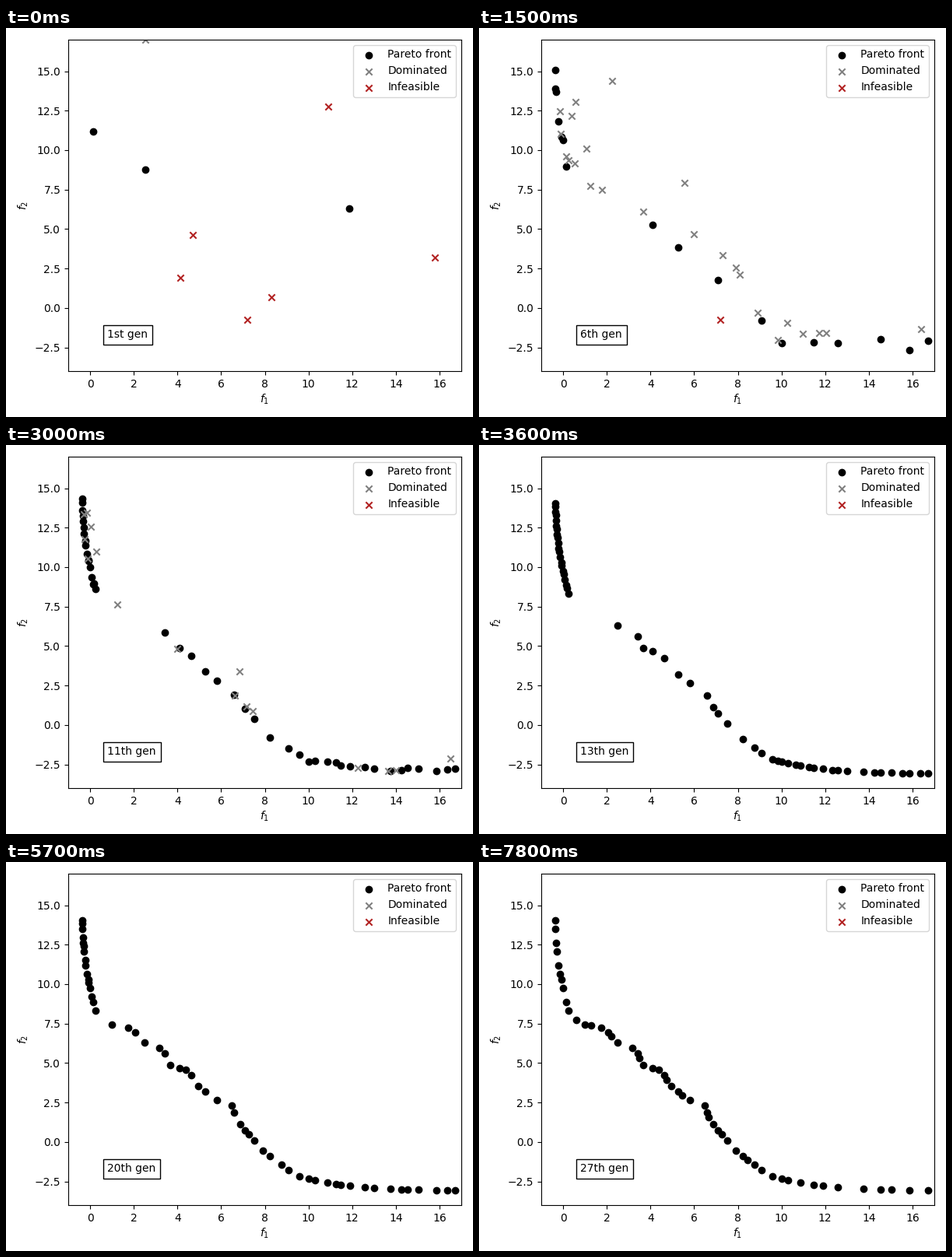
A matplotlib script that plays this animation: 600x500 px, repeating every 8 s.

```python
import numpy as np
import matplotlib.pyplot as plt
from matplotlib.animation import FuncAnimation

FRAME_MS, FRAMES, FRAMES_PER_GEN = 100, 80, 3
GOLDEN = (5 ** 0.5 - 1) / 2
rng = np.random.default_rng(4)

# First generation; one point of each kind drops out per generation
START = {
    "front": [(11.87, 6.3), (2.53, 8.78), (0.14, 11.2)],
    "dominated": [(2.53, 17.0)],
    "infeasible": [(10.9, 12.75), (15.8, 3.2), (4.7, 4.65),
                   (8.3, 0.67), (4.15, 1.9), (7.2, -0.75)],
}

# Bends of the middle part of the front
BENDS = np.array([(0.37, 7.88), (1.0, 7.45), (1.9, 7.2), (2.4, 6.35), (3.3, 5.9),
                  (3.65, 4.9), (4.55, 4.5), (4.85, 3.65), (5.65, 2.75),
                  (6.5, 2.3), (6.7, 1.4), (7.9, -0.55), (9.1, -1.8)])
ARC = np.r_[0, np.cumsum(np.hypot(*np.diff(BENDS, axis=0).T))]

# Front size of each branch at these generations
SIZE_GENS = (1, 6, 13, 27)


def left(u):
    f2 = 8 + 6.05 * u
    return -0.35 + 0.0191 * np.maximum(14 - f2, 0) ** 2, f2


def middle(u):
    return tuple(np.interp(u * ARC[-1], ARC, axis) for axis in BENDS.T)


def tail(u):
    f1 = 9.4 + 7.3 * u ** 1.3
    return f1, -3.1 + 0.87 * np.exp(-(f1 - 9.73) / 2.1)


BRANCHES = {left: (0, 7, 21, 10), middle: (0, 5, 16, 31), tail: (0, 6, 20, 12)}
slack = rng.random(max(map(max, BRANCHES.values())))


def front_points(gen):
    """Evenly filled branches that settle onto the final front."""
    points = START["front"][gen - 1:]
    lift = 2 * max(0, 1 - gen / 13)
    gap_end = 3.7 - 0.22 * (gen - 6)
    for branch, sizes in BRANCHES.items():
        i = np.arange(round(np.interp(gen, SIZE_GENS, sizes)))
        f1, f2 = branch(1 - i * GOLDEN % 1)
        shown = (f1 > gap_end) | (branch is not middle)
        points = points + list(zip(f1[shown], (f2 + lift * slack[i])[shown]))
    return points


def make_dominated(births=range(2, 11), per_gen=8):
    """Points above the front, closer to it the later they are born."""
    points = []
    for born in births:
        spread = 4 * 0.68 ** (born - 2)
        for i in range(per_gen):
            branch = list(BRANCHES)[i % len(BRANCHES)]
            f1, f2 = branch(rng.random())
            excess = spread * rng.exponential()
            points.append((born, f1 + 0.5 * excess, f2 + excess))
    return points


dominated = make_dominated()


def dominated_points(gen, lifetime=3):
    return START["dominated"][gen - 1:] + [
        (f1, f2) for born, f1, f2 in dominated if born <= gen < born + lifetime]


def infeasible_points(gen):
    return START["infeasible"][gen - 1:]


def ordinal(n):
    suffix = "th" if 10 <= n % 100 <= 20 else {1: "st", 2: "nd", 3: "rd"}.get(n % 10, "th")
    return f"{n}{suffix}"


fig, ax = plt.subplots(figsize=(6, 5), dpi=100)
fig.subplots_adjust(left=80 / 600, right=585 / 600, bottom=59 / 500, top=485 / 500)
layers = [
    (front_points, ax.scatter([], [], color="black", marker="o", label="Pareto front")),
    (dominated_points, ax.scatter([], [], color="gray", marker="x", label="Dominated")),
    (infeasible_points, ax.scatter([], [], color="firebrick", marker="x", label="Infeasible")),
]
ax.set(xlim=(-1, 17), ylim=(-4, 17))
ax.set_xlabel("$f_1$", labelpad=3)
ax.set_ylabel("$f_2$")
ax.legend(loc="upper right")
caption = ax.text(0.1, 0.1, "1st gen", transform=ax.transAxes,
                  bbox=dict(facecolor="white", edgecolor="black", pad=4))


def update(frame):
    gen = frame // FRAMES_PER_GEN + 1
    for points, layer in layers:
        layer.set_offsets(np.array(points(gen), dtype=float).reshape(-1, 2))
    caption.set_text(f"{ordinal(gen)} gen")
    return *(layer for _, layer in layers), caption


animation = FuncAnimation(fig, update, frames=FRAMES, interval=FRAME_MS,
                          repeat=True, repeat_delay=0)
plt.show()
```
